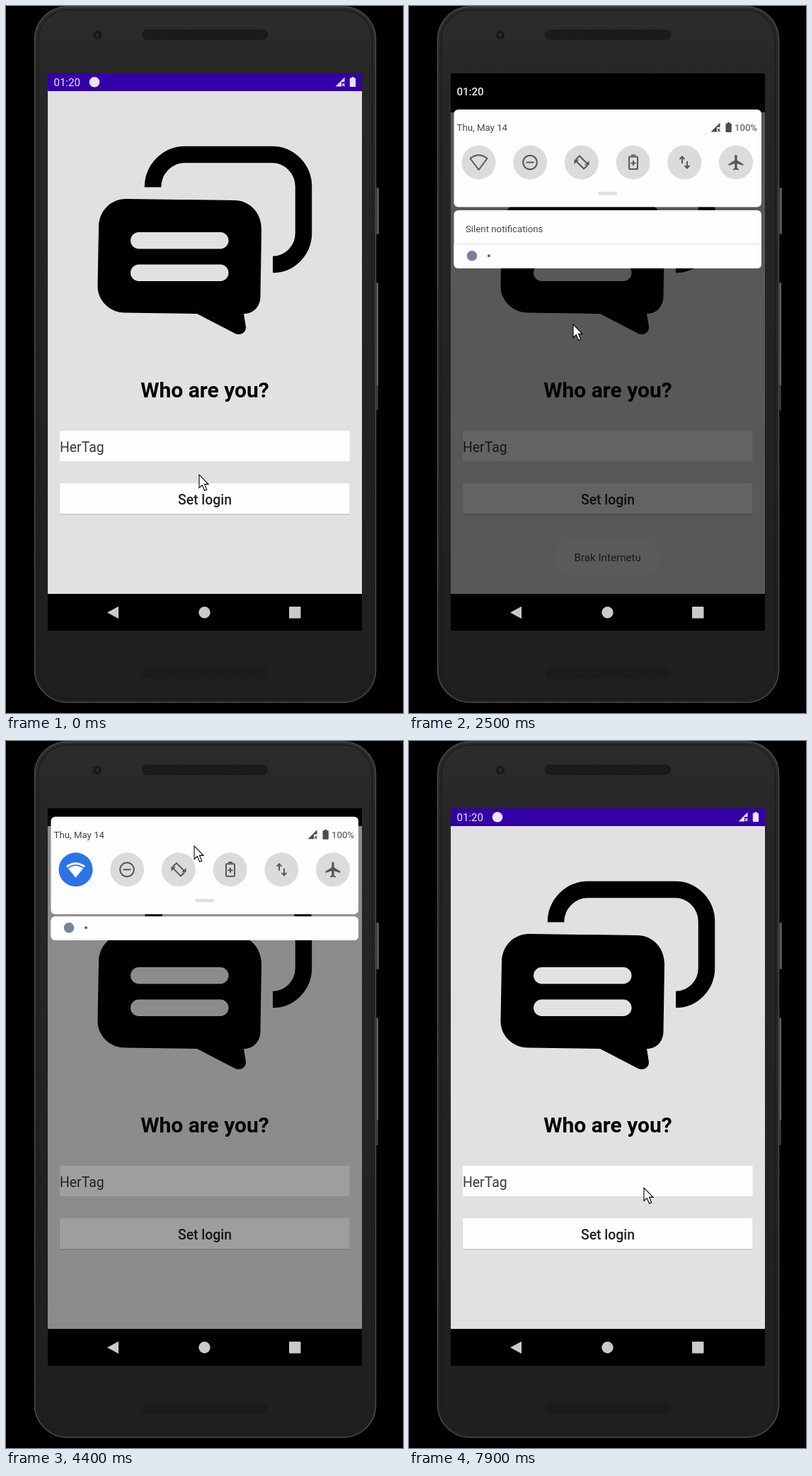
An HTML page that plays this animation: 561 by 997 pixels, repeating every 8000 ms.

```html
<!DOCTYPE html>
<html lang="en">
<head>
<meta charset="utf-8">
<title>Login screen demo</title>
<style>
html, body { margin: 0; width: 100%; height: 100%; overflow: hidden; background: #000; }
svg { display: block; width: 561px; height: 997px; font-family: Roboto, sans-serif; }
.small { font-size: 13.25px; fill: #454547; }
.body { font-size: 15.1px; fill: #363638; }
.field { font-size: 19.4px; fill: #38383a; }
.clock { font-size: 15px; }
.medium { font-weight: 500; }
.middle { text-anchor: middle; }
.glyph { fill: none; stroke: #575759; stroke-width: 2; }
.solid { fill: #575759; stroke: none; }
.paper { fill: #fefefe; }
.backdrop { fill: #e3e0e4; }
.rule { stroke: #dedee0; }
</style>
</head>
<body>
<svg viewBox="0 0 561 997" xmlns="http://www.w3.org/2000/svg">
  <defs>
    <linearGradient id="shell" x2="0" y2="1">
      <stop offset="0" stop-color="#2c2c2d"/>
      <stop offset=".1" stop-color="#272728"/>
      <stop offset="1" stop-color="#201e20"/>
    </linearGradient>
    <pattern id="mesh" width="4" height="4" patternUnits="userSpaceOnUse">
      <rect width="4" height="4" fill="#161617"/>
      <circle cx="1" cy="1" r=".8" fill="#2b2b2c"/>
      <circle cx="3" cy="3" r=".8" fill="#2b2b2c"/>
    </pattern>
    <clipPath id="screenClip"><rect x="59" y="95" width="444" height="734"/></clipPath>
    <clipPath id="listClip"><rect id="listMask" x="63.5" width="434.5" rx="6"/></clipPath>
    <g id="signal">
      <path d="M0 13L13 0V6.5H8.5V13Z"/>
      <path d="M9.5 8.5l3.5 4m0-4l-3.5 4" stroke="currentColor" stroke-width="1.2"/>
    </g>
    <path id="battery" d="M0 2.5Q0 1.5 1 1.5H2.7V0H5.6V1.5H7.3Q8.3 1.5 8.3 2.5V13Q8.3 14 7.3 14H1Q0 14 0 13Z"/>
  </defs>

  <rect width="561" height="997"/>
  <path d="M523 256h4v66h-4zM523 390h3v180h-3z" fill="#343436"/>
  <path d="M525.5 257v64M525 391v144" stroke="#757577" stroke-width="1.5"/>
  <rect x="40.5" y="1" width="482" height="981" rx="46" fill="url(#shell)" stroke="#4a4a4b" stroke-width="1.5"/>
  <rect x="45.5" y="5.5" width="472" height="971" rx="42" fill="none" stroke="#1b1b1c" stroke-width="1.5"/>
  <circle cx="129" cy="41" r="6" fill="#171718"/>
  <circle cx="129" cy="41" r="2.5" fill="#2a2a2c"/>
  <rect x="192" y="33" width="178" height="15" rx="7.5" fill="url(#mesh)"/>
  <rect x="192" y="934" width="178" height="15" rx="7.5" fill="url(#mesh)"/>

  <rect x="59" y="95" width="444" height="786"/>
  <g fill="#cacaca">
    <path d="M143 855.3L159 846.8V864Z"/>
    <circle cx="280.5" cy="855.3" r="8.2"/>
    <rect x="400" y="847" width="16.5" height="16.5" rx="1"/>
  </g>

  <g clip-path="url(#screenClip)">
    <rect class="backdrop" x="59" y="95" width="444" height="734"/>
    <rect x="59" y="95" width="444" height="25" fill="#3400a8"/>
    <g fill="#ebe4f7" color="#ebe4f7">
      <text class="clock" x="67.5" y="113">01:20</text>
      <circle cx="125" cy="107.3" r="7.3"/>
      <use href="#signal" x="465.5" y="100.5"/>
      <use href="#battery" x="485.8" y="100"/>
    </g>

    <path d="M207.5 255.5A45.5 46 0 0 1 253 209.5H376A44.5 45.5 0 0 1 420.5 255V320A43.5 44.5 0 0 1 377 364.5" fill="none" stroke="#000" stroke-width="23.5"/>
    <path d="M170 272L322 274C345 274 361 292 361 315L359.5 410C359 424 350 434 336 434L339 453C339 461 331 465 324 462L270 434L168 432.5C146 432 129 415 129.5 394L131 312C131 289 148 272 170 272Z"/>
    <rect class="backdrop" x="176" y="319" width="138.5" height="23.5" rx="11.7"/>
    <rect class="backdrop" x="176" y="364.5" width="138.5" height="23.5" rx="11.7"/>
    <text class="middle" x="281" y="551.5" font-size="30" font-weight="700">Who are you?</text>
    <rect class="paper" x="76" y="599" width="409.5" height="43"/>
    <text class="field" x="76" y="628.5">HerTag</text>
    <rect x="75.5" y="674" width="410.5" height="44" rx="2" fill="#cfcdd0"/>
    <rect class="paper" x="76" y="673" width="409.5" height="43" rx="1"/>
    <text class="field medium middle" x="281" y="702.5" style="fill:#222224">Set login</text>

    <g id="toast">
      <rect x="207" y="751.5" width="147" height="52" rx="26" fill="#ebeaec"/>
      <text class="middle" x="280.7" y="783" font-size="15.2" fill="#424244">Brak Internetu</text>
    </g>

    <rect id="scrim" x="59" y="95" width="444" height="734"/>

    <g id="panel">
      <rect id="header" x="59" y="95" width="444"/>
      <rect id="list" class="paper" x="63.5" width="434.5" rx="6"/>
      <g clip-path="url(#listClip)">
        <g id="notices">
          <text class="small" x="80" y="319">Silent notifications</text>
          <path class="rule" d="M63 340.5H498M63 454.5H498"/>
          <circle cx="90" cy="367.3" r="8.5" fill="#75809a"/>
          <text class="small" x="106" y="372">Ulvanor System</text>
          <text class="body" x="80.5" y="406">USB debugging connected</text>
          <text class="body" x="80.5" y="427.5">Tap to turn off USB debugging</text>
          <circle cx="90" cy="481.3" r="8.5" fill="#7c7c84"/>
          <text class="small" x="106" y="486">Ulvanor System</text>
          <text class="small" x="203" y="486">• Charging this device via USB</text>
          <path class="glyph" d="M470 479.5l3.3 3.3 3.3-3.3" style="stroke-width:1.5"/>
        </g>
        <g id="shelf">
          <rect class="paper" x="63" y="-35" width="435" height="35"/>
          <path class="rule" d="M63 -34.5H498"/>
          <circle cx="89" cy="-17.7" r="7.3" fill="#78839a"/>
          <circle cx="113" cy="-17.7" r="2" fill="#666668"/>
        </g>
      </g>
      <g id="quick">
        <text class="clock medium" x="67.5" y="126" fill="#ececec">01:20</text>
        <rect class="paper" x="63.5" y="146" width="434.5" height="137.5" rx="6"/>
        <text class="small" x="67.5" y="176">Thu, May 14</text>
        <g fill="#4c4c4e" color="#4c4c4e">
          <use href="#signal" x="426.5" y="164.5"/>
          <use href="#battery" x="447.5" y="164"/>
        </g>
        <text class="small" x="460" y="176">100%</text>
        <g id="tiles" fill="#dbdbdc"></g>
        <path id="wifiOff" class="glyph" d="M98.5 231L86.5 215Q98.5 205.5 110.5 215Z" stroke-linejoin="round"/>
        <g id="wifiOn">
          <path d="M98.5 232L85 215.5Q98.5 205.5 112 215.5Z" fill="#fff"/>
          <path d="M86.5 219Q98.5 209.5 110.5 219" fill="none" stroke="#2a74e6" stroke-width="1.8"/>
        </g>
        <g class="glyph">
          <circle cx="171" cy="220.5" r="9.8"/>
          <path d="M165.5 220.5h11"/>
          <path d="M236 216L241 211.5L251.5 222M252 225L247 229.5L236.5 219"/>
          <path class="solid" d="M254.5 218v6.5h-6.5zM233.5 223v-6.5h6.5z"/>
          <rect x="311" y="212.5" width="12" height="17.5" rx="1"/>
          <path d="M314 210.5h6M313.5 221.5h7M317 218v7"/>
          <path d="M386 222V212.5M382.5 216l3.5-3.5 3.5 3.5M393 219V228.5M389.5 225l3.5 3.5 3.5-3.5"/>
          <path class="solid" transform="translate(449.3 207.5) scale(1.1)" d="M21 16v-2l-8-5V3.5a1.5 1.5 0 0 0-3 0V9l-8 5v2l8-2.5V19l-2 1.5V22l3.5-1 3.5 1v-1.5L13 19v-5.5z"/>
        </g>
        <rect x="267" y="262" width="27" height="4.5" rx="2" fill="#e0e0e1"/>
      </g>
      <text id="manage" class="medium" x="87.5" y="539.5" font-size="15" fill="#f2f2f2">Manage</text>
    </g>
  </g>

  <path id="cursor" d="M0 0V18.5L4.3 14.6L7.6 22.3L10.7 21L7.5 13.4H13Z" fill="#fff" stroke="#000" stroke-width="1.1"/>
</svg>

<script>
const LOOP = 8000, STEP = 100;
const CLOSED = 120, SHELF = 281, HALF = 370, OPEN = 508;
const el = id => document.getElementById(id);
const clamp = (v, low, high) => Math.min(high, Math.max(low, v));

// Smooth 0-to-1 progress between two moments.
function ease(t, from, to) {
  const k = clamp((t - from) / (to - from), 0, 1);
  return k * k * (3 - 2 * k);
}

// Places where the pointer rests or turns.
const stops = [
  { at: 0, x: 273, y: 661 },
  { at: 1200, x: 324, y: 818 },
  { at: 1900, x: 246, y: 145 },
  { at: 2100, x: 245, y: 100 },
  { at: 2500, x: 232, y: 449 },
  { at: 3400, x: 113, y: 245 },
  { at: 4100, x: 256, y: 400 },
  { at: 4400, x: 266, y: 148 },
  { at: 5300, x: 334, y: 308 },
  { at: 6900, x: 338, y: 358 },
  { at: 7800, x: 355, y: 579 },
  { at: 7900, x: 332, y: 630 }
];

function pointerAt(t) {
  let { x, y } = stops[0];
  stops.slice(1).forEach((stop, i) => {
    const k = ease(t, stops[i].at, stop.at);
    x += (stop.x - stops[i].x) * k;
    y += (stop.y - stops[i].y) * k;
  });
  return [x, y];
}

// Lower edge of the pulled-down panel: drag, fling open, drag up, fling shut.
const edgeAt = t => CLOSED
  + (HALF - CLOSED) * ease(t, 2100, 2500)
  + (OPEN - HALF) * ease(t, 2500, 2700)
  - (OPEN - SHELF) * ease(t, 4100, 4400)
  - (SHELF - CLOSED) * ease(t, 4400, 4500);

const dimming = edge => .7 * Math.sin(clamp((edge - 175) / 185, 0, Math.PI / 2));

const tiles = Array.from({ length: 6 }, (_, i) => {
  const tile = document.createElementNS("http://www.w3.org/2000/svg", "circle");
  tile.setAttribute("cx", 98.5 + i * 72.7);
  tile.setAttribute("cy", 220.5);
  tile.setAttribute("r", 24);
  el("tiles").append(tile);
  return tile;
});

const show = (id, on) => el(id).style.display = on ? "" : "none";
const fade = (id, opacity) => el(id).setAttribute("opacity", opacity);
const move = (id, x, y) => el(id).setAttribute("transform", `translate(${x} ${y})`);

function drawPanel(t) {
  const edge = edgeAt(t);
  const shift = Math.min(0, (edge - HALF) * .44);
  const top = Math.min(288 + shift, edge - 33.5);
  const wifi = t >= 3600;
  show("panel", edge > CLOSED);
  fade("scrim", dimming(edge));
  for (const id of ["list", "listMask"]) {
    el(id).setAttribute("y", top);
    el(id).setAttribute("height", edge - top);
  }
  el("header").setAttribute("height", Math.max(25, 55 + shift));
  move("quick", 0, shift);
  move("notices", 0, shift);
  move("shelf", 0, edge);
  show("shelf", edge < OPEN - 5);
  fade("manage", ease(t, 2700, 3000) - ease(t, 4100, 4200));
  show("wifiOff", !wifi);
  show("wifiOn", wifi);
  tiles[0].style.fill = wifi ? "#2a74e6" : "";
}

function render(now) {
  const t = Math.floor(now % LOOP / STEP) * STEP;
  move("cursor", ...pointerAt(t));
  fade("toast", ease(t, 500, 800) - ease(t, 4200, 4400));
  drawPanel(t);
}

const start = performance.now();
function loop() {
  render(performance.now() - start);
  requestAnimationFrame(loop);
}
loop();
</script>
</body>
</html>
```
